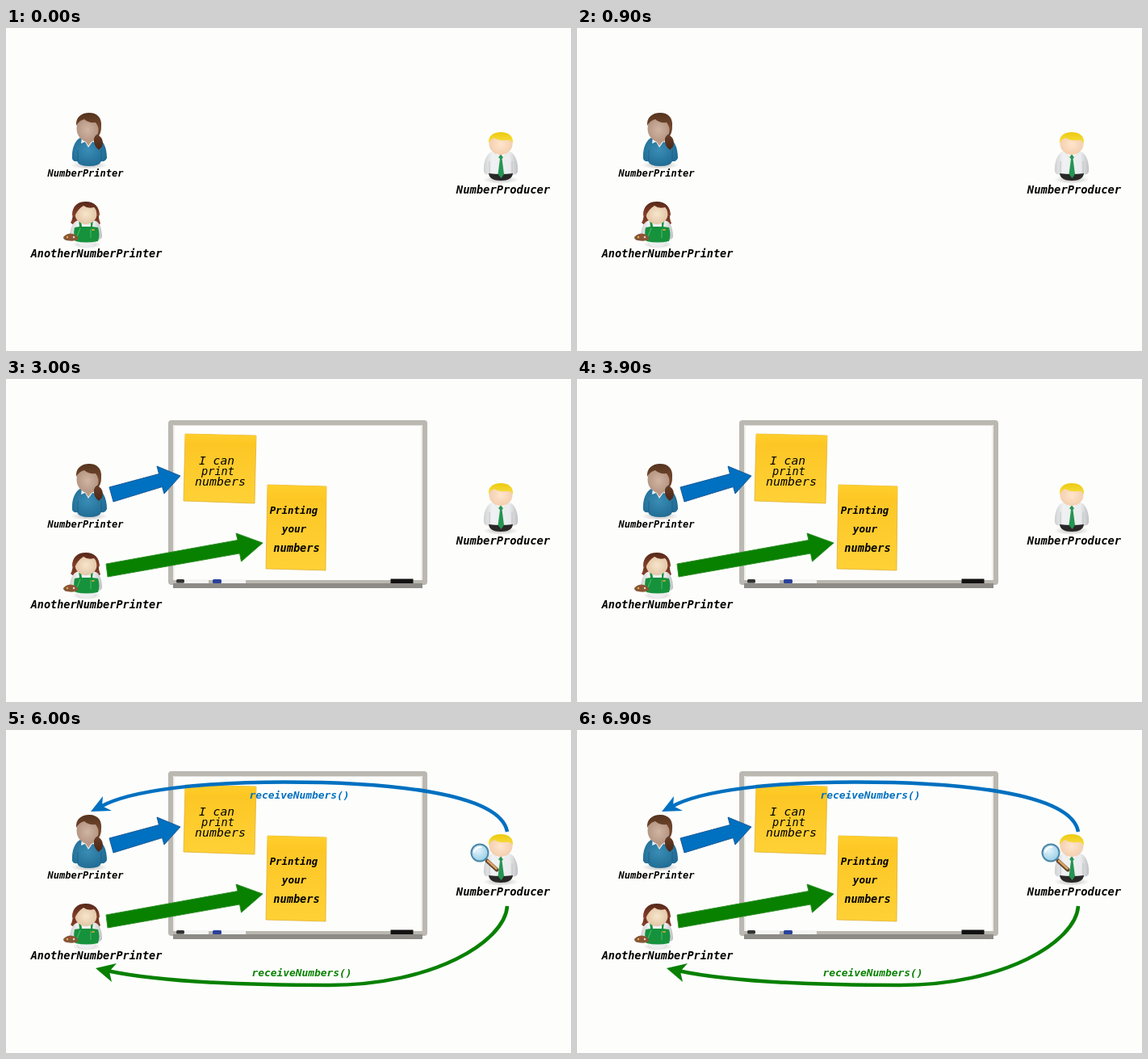
Recreate the animation shown at these times as an HTML page. Size 700x400 px, loop 7500 ms.

```html
<!DOCTYPE html>
<html lang="en">
<head>
<meta charset="utf-8">
<title>Number printers and producer</title>
<style>
  html, body { margin: 0; width: 100%; height: 100%; overflow: hidden; background: #fdfefc; }
  svg { display: block; width: 700px; height: 400px; }
  text { font: italic bold 12px "DejaVu Sans Mono", "Liberation Mono", monospace; text-anchor: middle; }
  #offer text { font-weight: normal; }
  [data-from] { visibility: hidden; }
</style>
</head>
<body>
<svg viewBox="0 0 700 400">
  <defs>
    <radialGradient id="tan" cx=".45" cy=".55" r=".6">
      <stop offset="0" stop-color="#d0b5a2"/><stop offset="1" stop-color="#ab8b78"/>
    </radialGradient>
    <radialGradient id="cream" cx=".5" cy=".5" r=".6">
      <stop offset="0" stop-color="#f7e6cc"/><stop offset="1" stop-color="#dfc09f"/>
    </radialGradient>
    <radialGradient id="pink" cx=".5" cy=".5" r=".6">
      <stop offset="0" stop-color="#ffe5cd"/><stop offset="1" stop-color="#f1cbaa"/>
    </radialGradient>
    <linearGradient id="brown" x2="0" y2="1">
      <stop offset="0" stop-color="#55341f"/><stop offset=".4" stop-color="#74472e"/><stop offset="1" stop-color="#4a2717"/>
    </linearGradient>
    <linearGradient id="auburn" x2="0" y2="1">
      <stop offset="0" stop-color="#552719"/><stop offset="1" stop-color="#8f432c"/>
    </linearGradient>
    <radialGradient id="jumper" cx=".45" cy=".45" r=".7">
      <stop offset="0" stop-color="#3a8db5"/><stop offset="1" stop-color="#1a648d"/>
    </radialGradient>
    <linearGradient id="shirt">
      <stop offset="0" stop-color="#cfd1d3"/><stop offset=".25" stop-color="#f0f1f2"/>
      <stop offset=".75" stop-color="#ebecee"/><stop offset="1" stop-color="#bfc1c4"/>
    </linearGradient>
    <linearGradient id="blond" x2="0" y2="1">
      <stop offset="0" stop-color="#edc90f"/><stop offset="1" stop-color="#f8df45"/>
    </linearGradient>
    <linearGradient id="paper" x2="0" y2="1">
      <stop offset="0" stop-color="#fcc522"/><stop offset="1" stop-color="#ffd136"/>
    </linearGradient>
    <linearGradient id="strip" x2="0" y2="1">
      <stop offset="0" stop-color="#ffcf2c"/><stop offset="1" stop-color="#fdc522"/>
    </linearGradient>
    <radialGradient id="glass" cx=".4" cy=".35" r=".7">
      <stop offset="0" stop-color="#e4f4fb"/><stop offset="1" stop-color="#94cce6"/>
    </radialGradient>
    <radialGradient id="shade">
      <stop offset="0" stop-color="#bbb"/><stop offset="1" stop-color="#bbb" stop-opacity="0"/>
    </radialGradient>
  </defs>

  <!-- whiteboard -->
  <g data-from="1">
    <rect x="204" y="54" width="315" height="198" rx="1" fill="#fdfefc" stroke="#bab8b0" stroke-width="6"/>
    <path d="M208 249V57.5H515V249" fill="none" stroke="#dfded9"/>
    <rect x="207" y="253" width="309" height="6" fill="#8d8b86"/>
    <rect x="220" y="248" width="31" height="5" fill="#f4f4f2"/>
    <rect x="211" y="248" width="10" height="4.5" rx="1.5" fill="#333"/>
    <rect x="266" y="248" width="31" height="5" fill="#f4f4f2"/>
    <rect x="256" y="248" width="11" height="5" rx="1.5" fill="#2b429a"/>
    <rect x="476.5" y="247.5" width="28" height="5.5" fill="#111"/>
  </g>

  <!-- woman in blue -->
  <g>
    <ellipse cx="103" cy="170" rx="23" ry="5" fill="url(#shade)"/>
    <path d="M94 135C85 138 81 150 82 162Q84 166 88 165Q90 171 103 171Q116 171 118 165Q123 166 125 161C125 149 121 138 112 135Z" fill="url(#jumper)"/>
    <path d="M89 151V165M118 151V165" stroke="#17587c" stroke-width=".7"/>
    <path d="M94 135L93 143L98 141L102 148L107 141L111 142L111 135Z" fill="#f2f5f7"/>
    <path d="M97 138L102 146L108 138Z" fill="#c29a84"/>
    <ellipse cx="102.5" cy="124.500" rx="15" ry="16.5" fill="url(#tan)"/>
    <path d="M87 121C86 111 93 105 103 105C113 105 119 111 118 122Q118 129 115 133Q122 138 119 147L115 151Q108 146 109 137Q110 133 114 131Q116 123 111 117Q102 118 97 113Q91 114 87 121Z" fill="url(#brown)"/>
  </g>

  <!-- painter -->
  <g>
    <ellipse cx="100" cy="268" rx="18" ry="5" fill="url(#shade)"/>
    <path d="M83 226Q83 237 80 241Q84 246 91 242L109 242Q114 246 117 242Q114 235 115 226Z" fill="url(#auburn)"/>
    <path d="M90 238C83 239 79 248 79 258Q83 263 87 261Q88 271 100 271Q111 271 112 262Q117 263 119 259C119 248 116 239 108 238Z" fill="url(#shirt)"/>
    <path d="M90 238L91 246L85 247Q83 256 86 264Q99 267 114 264Q117 256 114 247L107 246L108 238L105 239L105 246L94 246L93 239Z" fill="#16913c"/>
    <path d="M92 248L88 258M105 249V260" stroke="#48b36b" stroke-width="1.2"/>
    <ellipse cx="108" cy="250" rx="2" ry="1" fill="#d7a833"/>
    <ellipse cx="99" cy="230.500" rx="13.5" ry="12.5" fill="url(#cream)"/>
    <path d="M82 232C82 221 88 215 99 215C110 215 116 222 116 232L113 233Q113 226 109 222Q101 224 96 220Q88 225 85 234Z" fill="url(#auburn)"/>
    <path d="M71 259Q76 253 83 255Q90 257 89 262Q84 265 75 263Q71 262 71 259Z" fill="#875737"/>
    <circle cx="76" cy="259" r="1.2" fill="#e2b045"/>
    <circle cx="80" cy="257" r="1.2" fill="#b9422f"/>
    <circle cx="84" cy="259" r="1.2" fill="#e8ddd0"/>
  </g>

  <!-- man with tie -->
  <g>
    <ellipse cx="613" cy="188" rx="22" ry="5" fill="url(#shade)"/>
    <path d="M602 153C595 155 591 167 592 178Q594 183 599 181L627 181Q632 183 634 178C635 167 631 155 624 153Z" fill="url(#shirt)"/>
    <path d="M599 165V180M627 165V180" stroke="#b5b7ba" stroke-width=".7"/>
    <path d="M598 180Q613 182 628 180Q627 189 613 189Q599 189 598 180Z" fill="#292728"/>
    <path d="M611 156H615L616 160L614.5 162L617 181L613.5 186L609.5 181L612 162L610 160Z" fill="#249552"/>
    <path d="M604 153L610 160L613 156L616 160L622 153Z" fill="#fff" stroke="#d2d3d5" stroke-width=".6"/>
    <ellipse cx="613" cy="143.5" rx="14.5" ry="13.5" fill="url(#pink)"/>
    <path d="M598 143C597 134 603 129 613 129C623 129 629 134 628 143Q625 138 620 139Q611 140 605 136Q600 138 598 143Z" fill="url(#blond)"/>
  </g>

  <!-- magnifier -->
  <g data-from="3" stroke-linecap="round">
    <path d="M596 162L608 173" stroke="#62452f" stroke-width="5"/>
    <path d="M597 162L607.500 171.500" stroke="#d9a561" stroke-width="2.6"/>
    <circle cx="587" cy="152" r="10.5" fill="url(#glass)" stroke="#4d87a5" stroke-width="2"/>
    <path d="M580 151Q582 145 588 145" fill="none" stroke="#fff" stroke-width="2"/>
  </g>

  <text x="98.500" y="184">NumberPrinter</text>
  <text x="112" y="284" style="font-size:13.500px">AnotherNumberPrinter</text>
  <text x="616" y="205" style="font-size:13.800px">NumberProducer</text>

  <!-- sticky notes and thick arrows -->
  <g data-from="2">
    <g stroke="#dba92a" stroke-width=".7" fill="url(#paper)">
      <path d="M222 68L310 70L308 154L220 151Z"/>
      <path d="M324 131L397 133L396 237L322 235Z"/>
    </g>
    <g fill="url(#strip)">
      <path d="M222 68L310 70L309.600 83L221.600 81Z"/>
      <path d="M324 131L397 133L396.800 152L323.600 150Z"/>
    </g>
    <g id="offer"></g>
    <g id="job"></g>
    <path d="M128 134L189.500 117.500L187 108L216 120L196 142L193.500 133.500L133 152Z" fill="#0070c0" stroke="#1a5a96"/>
    <path d="M124 229L287 199.500L285 191L318 203L291.500 226L289.500 216L126 245Z" fill="#088000" stroke="#2f8f24"/>
  </g>

  <!-- calls back to the printers -->
  <g data-from="4">
    <g fill="none" stroke-width="4.500">
      <path d="M621 126C612 76 465 64.500 345 64.500C245 64.500 155 74 117 95" stroke="#0070c0"/>
      <path d="M621 218C618 262 530 316 400 316C290 316 190 312 125 298" stroke="#088000"/>
    </g>
    <path d="M105 101L120 82L119 94L131 100Z" fill="#0070c0"/>
    <path d="M111 295L137 289L128 299L131 312Z" fill="#088000"/>
    <text x="363.500" y="85" fill="#0070c0" style="font-size:12.900px">receiveNumbers()</text>
    <text x="366.500" y="305" fill="#088000" style="font-size:12.900px">receiveNumbers()</text>
  </g>
</svg>
<script>
  const STEP = 1500, STEPS = 5;

  // [text, centre x, baseline, size]
  const notes = {
    offer: [["I can", 261, 106, 14.6], ["print", 262.5, 119, 13.6], ["numbers", 265.5, 132, 14.9]],
    job: [["Printing", 356.5, 167, 12.4], ["your", 357, 190, 12.6], ["numbers", 360, 214, 13.6]]
  };
  for (const [id, lines] of Object.entries(notes)) {
    const group = document.getElementById(id);
    for (const [words, x, y, size] of lines) {
      const line = document.createElementNS("http://www.w3.org/2000/svg", "text");
      line.textContent = words;
      line.setAttribute("x", x);
      line.setAttribute("y", y);
      line.style.fontSize = size + "px";
      group.append(line);
    }
  }

  const parts = [...document.querySelectorAll("[data-from]")];
  function draw() {
    const step = Math.floor(performance.now() / STEP) % STEPS;
    for (const part of parts) {
      part.style.visibility = step >= +part.dataset.from ? "visible" : "hidden";
    }
    requestAnimationFrame(draw);
  }
  draw();
</script>
</body>
</html>
```
